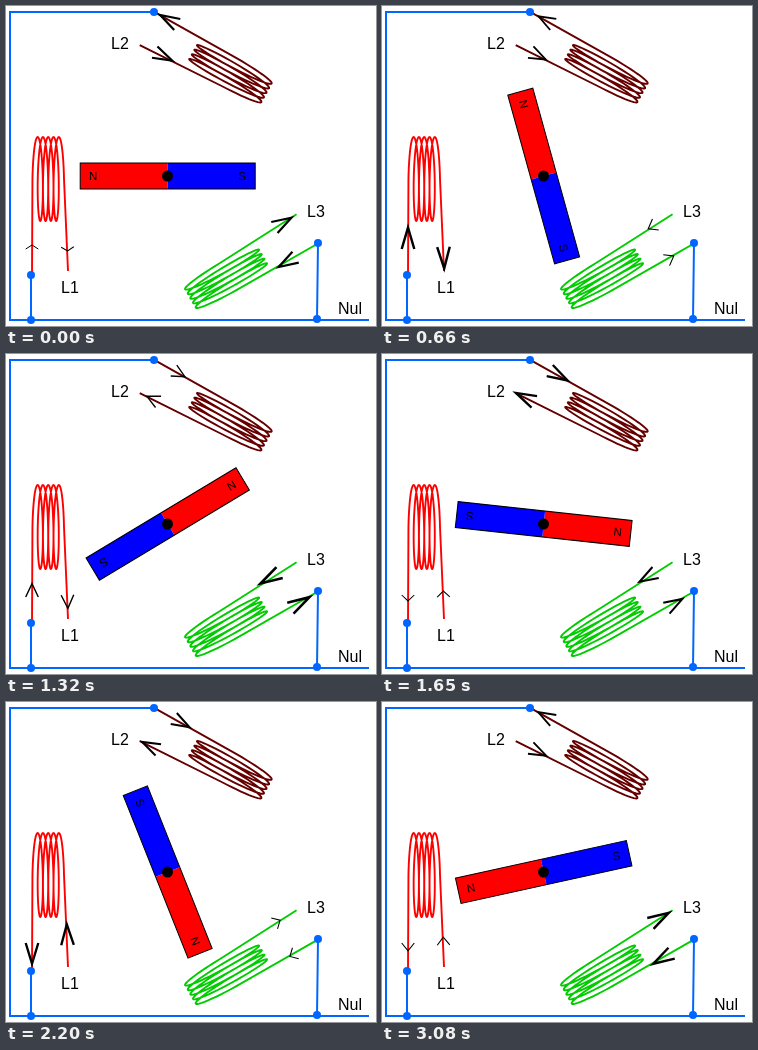
An HTML page for the animation above (3.19 s loop, 370 by 320 pixels).

```html
<!DOCTYPE html>
<html lang="en">
<head>
<meta charset="utf-8">
<title>Three-phase motor</title>
<style>
  html, body { margin: 0; width: 100%; height: 100%; overflow: hidden; background: #fff; }
  svg { display: block; width: 370px; height: 320px; }
  text { font: 16px "Liberation Sans", Arial, sans-serif; }
  .pole { font-size: 11.5px; text-anchor: middle; }
  .coil { fill: none; stroke-width: 1.9; stroke-linejoin: round; }
  .supply { fill: none; stroke: #06f; stroke-width: 2; }
  .node { fill: #06f; }
  .arrow { fill: none; stroke: #000; }
</style>
</head>
<body>
<svg id="stage" viewBox="0 0 370 320">
  <g id="coils"></g>
  <path class="supply" d="M148 6H4V314H363M25 269V314M312 237L311 314"/>
  <g id="nodes"></g>
  <g id="arrows"></g>
  <g id="magnet">
    <path fill="#f00" d="M-87.5 -13H0V13H-87.5Z"/>
    <path fill="#00f" d="M0 -13H87.5V13H0Z"/>
    <rect x="-87.5" y="-13" width="175" height="26" fill="none" stroke="#000"/>
    <text class="pole" x="-74.5" y="4">N</text>
    <text class="pole" x="74.5" y="4">S</text>
  </g>
  <circle cx="161.5" cy="170" r="5.5"/>
  <text x="55" y="287">L1</text>
  <text x="105" y="43">L2</text>
  <text x="301" y="211">L3</text>
  <text x="332" y="308">Nul</text>
</svg>
<script>
const STEPS = 29, STEP_MS = 110;
const $ = id => document.getElementById(id);

function add(parent, tag, attrs) {
  const el = document.createElementNS("http://www.w3.org/2000/svg", tag);
  for (const key in attrs) el.setAttribute(key, attrs[key]);
  return $(parent).appendChild(el);
}

// Winding relative to its supply terminal, leads pointing down
function windingPath() {
  const pts = ["0 0"];
  for (let i = 0; i <= 216; i++) {
    const t = i * Math.PI / 24;
    const x = 4.3 + 5.3 * t / (2 * Math.PI) - 3.85 * Math.cos(t);
    pts.push(x.toFixed(2) + " " + (-96 - 42 * Math.sin(t)).toFixed(2));
  }
  return "M" + pts.join("L") + "L36 -4";
}

// leads: arrow anchor x, y and heading in degrees for positive current
const phases = [
  { color: "#f00", at: [26, 269], turn: 0, shift: 0, back: 1,
    leads: [[26, 242, -90], [61.5, 242, 88]] },
  { color: "#600", at: [147.7, 5.7], turn: 119, shift: 60, back: 2,
    leads: [[169.5, 17.5, 209], [150.5, 47, 26]] },
  { color: "#0c0", at: [312, 237.5], turn: 240, shift: 120, back: 3,
    leads: [[271, 220, -30], [287, 252.7, 150]] }
];

const winding = windingPath();
for (const p of phases) {
  add("coils", "path", { class: "coil", d: winding, stroke: p.color,
    transform: `translate(${p.at}) rotate(${p.turn})` });
  p.arrows = p.leads.map(() => add("arrows", "path", { class: "arrow" }));
}
for (const [cx, cy] of [[148, 6], [25, 269], [25, 314], [312, 237], [311, 313]])
  add("nodes", "circle", { class: "node", cx, cy, r: 4 });

function pose(step) {
  const angle = step * 360 / STEPS;
  $("magnet").setAttribute("transform", `translate(161.7 170) rotate(${angle})`);
  for (const p of phases) {
    const current = Math.sin((angle + p.shift) * Math.PI / 180);
    const size = Math.abs(current);
    const tip = 4 + 18 * size - p.back;
    p.leads.forEach(([x, y, heading], i) => {
      const dir = heading + (current < 0 ? 180 : 0);
      const arrow = p.arrows[i];
      arrow.setAttribute("d", `M${-p.back} -6.3L${tip} 0L${-p.back} 6.3`);
      arrow.setAttribute("transform", `translate(${x} ${y}) rotate(${dir})`);
      arrow.setAttribute("stroke-width", 1 + 1.6 * size * size);
    });
  }
}

const start = performance.now();
function tick() {
  pose(Math.floor((performance.now() - start) / STEP_MS) % STEPS);
  requestAnimationFrame(tick);
}
tick();
</script>
</body>
</html>
```
